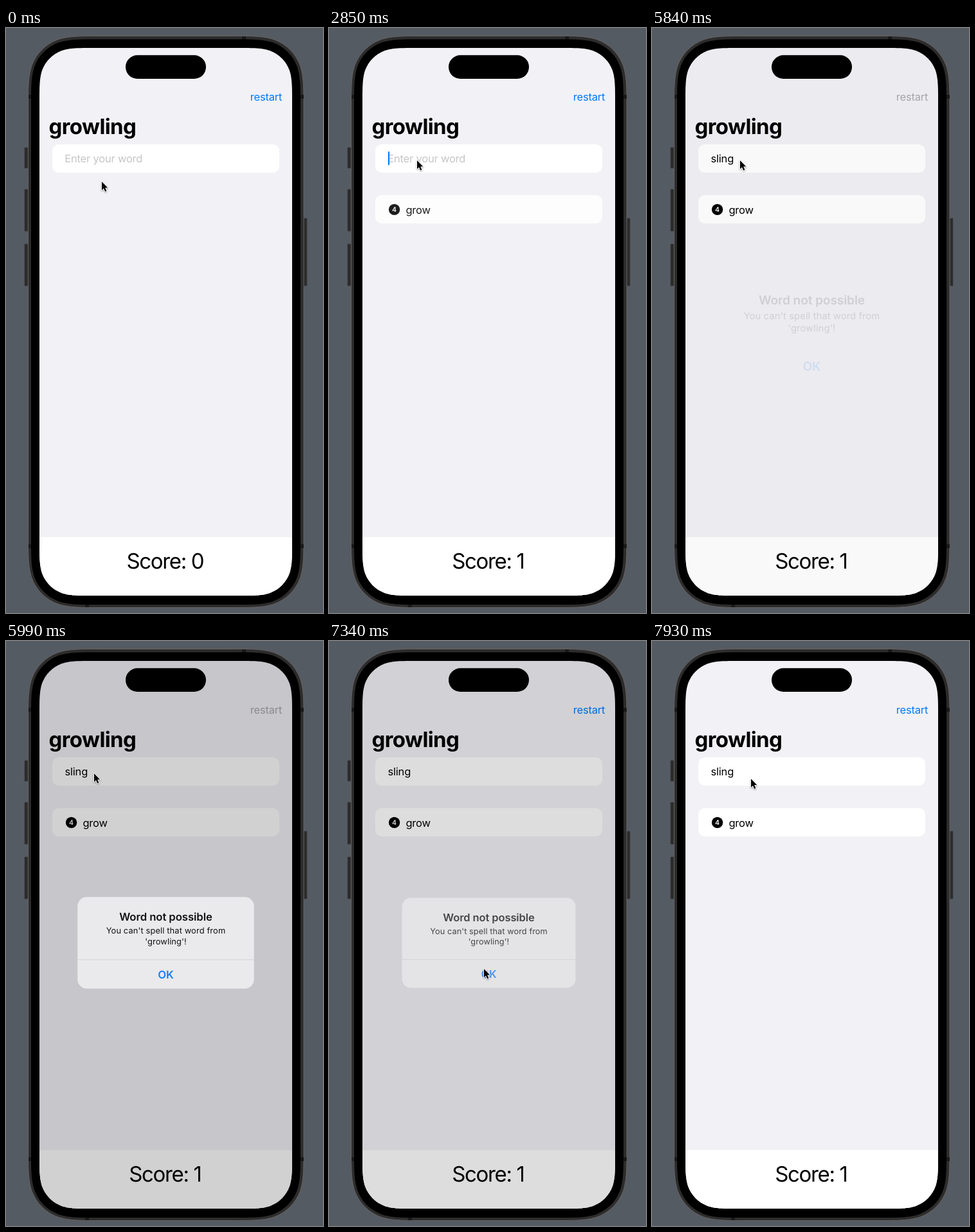
An HTML page for the animation above (8000 ms loop, 493 by 910 pixels).

```html
<!DOCTYPE html>
<html lang="en">
<head>
<meta charset="utf-8">
<title>Word game</title>
<style>
  html, body { margin: 0; width: 493px; height: 910px; overflow: hidden; background: #555b63; }
  svg { display: block; }
  text {
    font: 16.5px Inter, "Liberation Sans", sans-serif;
    font-optical-sizing: none;
    letter-spacing: -.2px;
    text-rendering: geometricPrecision;
  }
  .mid { text-anchor: middle; }
  #heading { font-size: 33px; font-weight: 700; letter-spacing: -.6px; }
  #score { font-size: 33px; letter-spacing: -1.35px; }
  #hint { fill: #c5c5c7; }
  #restart { text-anchor: end; }
  #badge { font-size: 10.5px; font-weight: 600; letter-spacing: 0; fill: #fff; }
  #alert .strong { font-weight: 600; letter-spacing: -.1px; }
  #alert .note { font-size: 12.7px; letter-spacing: .1px; }
  .blue { fill: #007aff; }
  #pointer { filter: drop-shadow(0 1px 1px rgba(0, 0, 0, .35)); }
</style>
</head>
<body>
<svg width="493" height="910" viewBox="0 0 493 910">
  <path fill="#2c2c2c" stroke="#3b3c3e" stroke-width=".6"
    d="M29 186h5v32h-5zM29 251h5v65h-5zM29 336h5v65h-5zM463 296h5v105h-5z"/>
  <path id="rim" fill="#2d2c2c" stroke="#67635f"/>
  <path fill="#191919" d="M367 13h6v5h-6zM123 896h6v5h-6zM35 104h5v6h-5zM458 104h5v6h-5zM35 803h5v6h-5zM458 803h5v6h-5z"/>
  <path id="bezel"/>
  <clipPath id="clip"><path id="screen"/></clipPath>

  <g clip-path="url(#clip)">
    <rect x="52" y="31" width="393" height="852" fill="#f2f1f6"/>
    <text id="restart" x="429.3" y="113">restart</text>
    <text id="heading" x="66.5" y="164.5">growling</text>

    <rect x="72" y="181" width="353" height="44" rx="10" fill="#fff"/>
    <text id="hint" x="91.3" y="209">Enter your word</text>
    <text id="typed" x="91.5" y="209"></text>
    <rect id="caret" class="blue" y="192" width="2" height="21.5" rx="1"/>

    <g id="row">
      <rect x="72" y="260" width="353" height="44" rx="10" fill="#fff"/>
      <circle cx="101.6" cy="282.4" r="8.7"/>
      <text id="badge" class="mid" x="101.5" y="286.2">4</text>
      <text x="119.4" y="288.5">grow</text>
    </g>

    <rect x="52" y="792" width="393" height="91" fill="#fff"/>
    <text id="score" class="mid" x="247.4" y="841"></text>

    <rect id="shade" x="52" y="31" width="393" height="852"/>
    <g id="alert">
      <rect x="-135" y="-70" width="270" height="140" rx="14" fill="#eeeef0"/>
      <rect x="-135" y="25.5" width="270" height=".8" fill="#3c3c43" opacity=".17"/>
      <text class="mid strong" y="-34">Word not possible</text>
      <text class="mid note" y="-14">You can't spell that word from</text>
      <text class="mid note" y="2">'growling'!</text>
      <text class="mid strong blue" y="54.5">OK</text>
    </g>
  </g>

  <rect x="186" y="42.3" width="125" height="36.7" rx="18.3"/>
  <path id="pointer" d="M0 0V13.2L3 10.4 5.2 15.4 7.4 14.4 5.2 9.5H9.3Z"
    stroke="#fff" stroke-width="1.8" stroke-linejoin="round" paint-order="stroke"/>
</svg>

<script>
const LOOP = 8000;
const FOCUS = 750, SUBMIT = 2690, REJECT = 5690, ALERT = 5815, DISMISS = 7288;
const $ = id => document.getElementById(id);
const set = (id, attrs) => {
  for (const name in attrs) $(id).setAttribute(name, attrs[name]);
};

// Rounded rectangle with continuous-curvature corners; the bend is in units
// of the radius: distance before the corner, distance past it
function squircle(x, y, w, h, r) {
  const half = [[1.528, 0], [1.088, 0], [.868, 0], [.631, .075], [.372, .169]];
  const bend = [...half, ...half.map(([u, v]) => [v, u]).reverse()];
  const corners = [[x + w, y], [x + w, y + h], [x, y + h], [x, y]];
  return 'M' + corners.map(([cx, cy], i) => {
    const dx = [1, 0, -1, 0][i], dy = [0, 1, 0, -1][i];
    const [first, ...rest] = bend.map(([u, v]) =>
      `${cx - r * (dx * u + dy * v)} ${cy + r * (dx * v - dy * u)}`);
    return first + 'C' + rest.join(' ');
  }).join('L') + 'Z';
}
set('rim', { d: squircle(34.5, 12.5, 428.5, 889, 73) });
set('bezel', { d: squircle(39, 17.5, 419, 879.5, 68) });
set('screen', { d: squircle(52, 31, 393, 852, 55) });

// Critically damped spring from 0 to 1
function settle(ms) {
  const x = Math.max(0, ms) * .02285;
  return 1 - (1 + x) * Math.exp(-x);
}

function smooth(t, from, to) {
  const k = Math.min(1, Math.max(0, (t - from) / (to - from)));
  return k * k * (3 - 2 * k);
}

// Each glide: start, end, target point
const glides = [
  [0, 450, 146, 207], [FOCUS, 1050, 137, 206], [6140, 7190, 241, 510], [7340, 7930, 154, 214.5]
];
function pointerAt(t) {
  return glides.reduce(([x, y], [from, to, tx, ty]) => {
    const k = smooth(t, from, to);
    return [x + (tx - x) * k, y + (ty - y) * k];
  }, [149, 239]);
}

const typeOut = (word, ms, pace) => word.slice(0, Math.max(0, Math.floor(ms / pace) + 1));

// The caret blink restarts after each action
function caretOn(t) {
  const last = [FOCUS, 1600, 2200, SUBMIT, 4790, 5390].filter(a => a <= t).pop();
  return t < REJECT && (t - last) % 1200 < 600;
}

// The picture advances in ticks of 150 ms with a slight drift
function tick(t) {
  const drift = t < 3500 ? 0 : t < 7780 ? 10 : 20;
  return Math.floor((t + drift) / 150) * 150 - drift;
}

function draw() {
  const t = tick(performance.now() % LOOP);

  const word = t < SUBMIT ? typeOut('grow', t - 1600, 200) : typeOut('sling', t - 4790, 150);
  $('typed').textContent = word;
  set('hint', { opacity: word ? 0 : 1 });
  const end = word ? $('typed').getComputedTextLength() - .2 : 0;
  set('caret', { x: 92 + end, opacity: caretOn(t) ? 1 : 0 });

  set('row', { opacity: settle(t - SUBMIT) });
  $('score').textContent = 'Score: ' + (t < SUBMIT ? 0 : 1);

  const entered = settle(t - ALERT), shown = entered - settle(t - DISMISS);
  set('shade', { opacity: .2 * shown });
  set('alert', { opacity: shown, transform: `translate(248.5 469.5) scale(${1.18 - .18 * entered})` });
  set('restart', { fill: t >= ALERT && t < DISMISS ? '#a9a9ad' : '#007aff' });

  set('pointer', { transform: `translate(${pointerAt(t)})` });
  requestAnimationFrame(draw);
}
draw();
</script>
</body>
</html>
```
